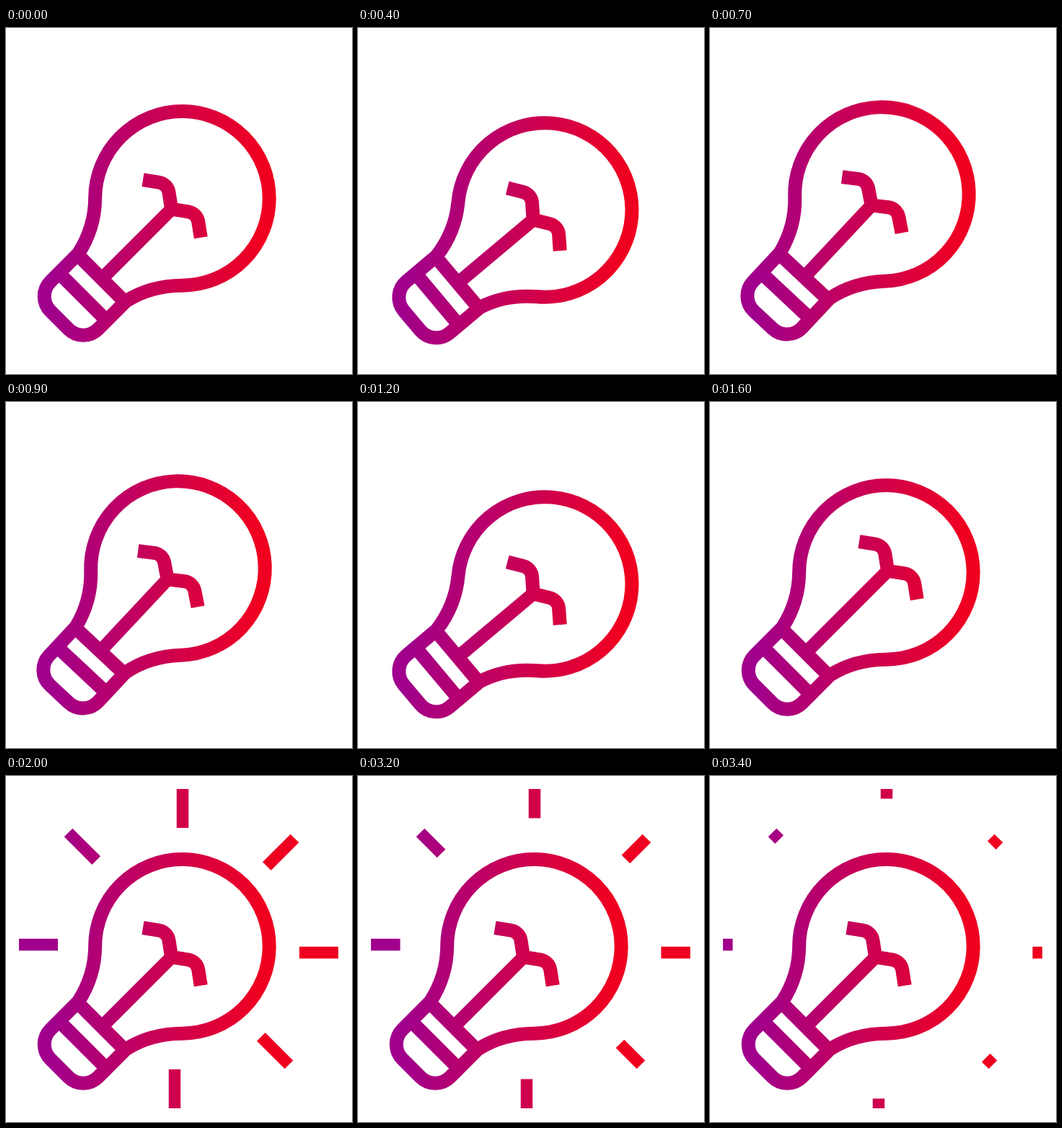
Recreate the animation shown at these times as an HTML page. Size 480 px wide and 480 px high, loop 3.5 s.

```html
<!DOCTYPE html>
<html lang="en">
<head>
<meta charset="utf-8">
<title>Light bulb</title>
<style>
  html, body { margin: 0; height: 100%; overflow: hidden; background: #fff; }
  svg { display: block; width: 100%; height: 100%; }
</style>
</head>
<body>
<svg viewBox="0 0 480 480" fill="none">
  <defs>
    <linearGradient id="ink" gradientUnits="userSpaceOnUse" x1="62" y1="0" x2="355" y2="0">
      <stop stop-color="#a0008c"/>
      <stop offset="1" stop-color="#f00020"/>
    </linearGradient>
    <!-- The bulb is drawn upright around its centre, then tilted by 45 degrees -->
    <mask id="shape" maskUnits="userSpaceOnUse" x="-100" y="-100" width="680" height="680">
      <g transform="translate(244.4 236.4) rotate(45)" stroke="#fff" stroke-width="19">
        <path d="M-85.4 85.4A120.8 120.8 0 1 1 85.4 85.4C68 103 52 127 45.7 156V210.7
          a29 29 0 0 1 -29 29H-18.7a29 29 0 0 1 -29 -29V156C-54 127 -68 103 -85.4 85.4Z
          M-47.7 157.7H45.7M-47.7 194H45.7"/>
        <path id="stem" stroke-width="18.5"/>
        <path id="hooks" d="M-56.8 20.2L-38.7 7.1A16.8 16.8 0 0 1 -19 7.1L0 21L19 7.1
          A16.8 16.8 0 0 1 38.7 7.1L56.8 20.2"/>
      </g>
    </mask>
  </defs>
  <g id="bulb">
    <rect width="480" height="480" fill="url(#ink)" mask="url(#shape)"/>
  </g>
  <path id="rays" stroke="url(#ink)" stroke-width="16.5"/>
</svg>
<script>
const LOOP = 3500, STEP = 100, MID = 239.5;
const [bulb, stem, hooks, rays] =
  ['bulb', 'stem', 'hooks', 'rays'].map(id => document.getElementById(id));

// [time, value] keys, eased in and out
const swing = [[0, 0], [200, -5.6], [500, 8.7], [800, -5.6], [1100, 8.7], [1400, -5.6], [1600, 0]];
const push = [[1400, 0], [1600, 24], [1800, 0]];

const progress = (t, from, to) => Math.min(1, Math.max(0, (t - from) / (to - from)));
const mix = (a, b, k) => a + (b - a) * k;

function track(keys, t) {
  let value = keys[0][1];
  for (let i = 1; i < keys.length; i++) {
    const k = progress(t, keys[i - 1][0], keys[i][0]);
    value = mix(value, keys[i][1], k * k * (3 - 2 * k));
  }
  return value;
}

// Rays run from the outer to the inner end, relative to the middle;
// each kind repeats by quarter turns, with none over the bulb's base.
const lines = [];
function addRays(count, x1, y1, x2, y2) {
  for (let i = 0; i < count; i++) {
    lines.push([x1, y1, x2, y2]);
    [x1, y1, x2, y2] = [-y1, x1, -y2, x2];
  }
}
addRays(4, 5.5, -221.5, 5.5, -167.5);
addRays(3, -153, -161, -114.3, -122.3);

function rayPath(from, to) {
  if (from >= to) return '';
  return lines.map(([x1, y1, x2, y2]) => {
    const at = k => `${MID + mix(x1, x2, k)} ${MID + mix(y1, y2, k)}`;
    return `M${at(from)}L${at(to)}`;
  }).join('');
}

function draw(t) {
  const lift = track(push, t);
  bulb.setAttribute('transform', `rotate(${track(swing, t)} 67 414)`);
  stem.setAttribute('d', `M0 155V${22 - lift}`);
  hooks.setAttribute('transform', `translate(0 ${-lift})`);
  rays.setAttribute('d', rayPath(1 - progress(t, 1600, 2000), 1 - progress(t, 3100, 3500)));
}

const start = performance.now();
function tick() {
  const t = (performance.now() - start) % LOOP;
  draw(Math.floor(t / STEP) * STEP);
  requestAnimationFrame(tick);
}
tick();
</script>
</body>
</html>
```
